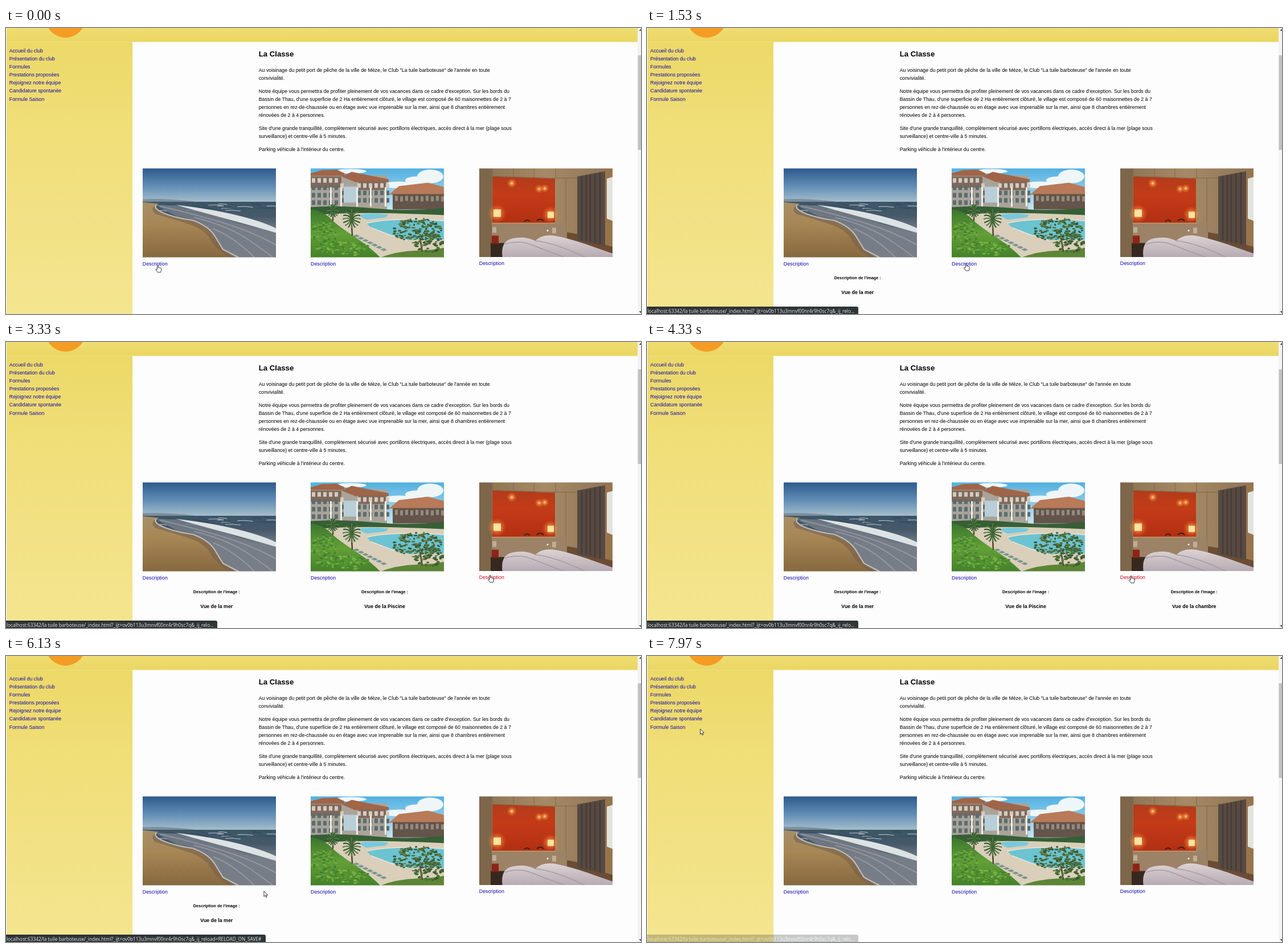
Recreate the animation shown at these times as an HTML page. Size 1115 by 502 pixels, loop 8 s.

```html
<!DOCTYPE html>
<html lang="fr">
<head>
<meta charset="utf-8">
<title>La Classe</title>
<style>
  html, body { margin: 0; width: 100%; height: 100%; overflow: hidden; background: #fdfdfd; }
  #stage { display: block; width: 1115px; height: 502px; }
  text { font: 8.8px "Liberation Sans", Arial, sans-serif; white-space: pre; }
  .link { fill: #1208ad; }
  .link.pressed { fill: #d2051c; }
  .title { font-size: 13.2px; font-weight: bold; }
  .label { font-size: 7.3px; font-weight: bold; text-anchor: middle; }
  .caption { font-weight: bold; text-anchor: middle; }
  #url { font: 8.3px "Open Sans", "Noto Sans", sans-serif; fill: #e8eaec; }
</style>
</head>
<body>
<svg id="stage" viewBox="0 0 1115 502">
  <defs>
    <linearGradient id="side" x2="0" y2="1">
      <stop stop-color="#ecd967"/><stop offset=".3" stop-color="#f0de77"/><stop offset="1" stop-color="#f4e590"/>
    </linearGradient>
    <linearGradient id="head" x2="0" y2="1">
      <stop stop-color="#efdd72"/><stop offset="1" stop-color="#ead662"/>
    </linearGradient>
    <linearGradient id="sky" x2="0" y2="1">
      <stop stop-color="#2a568b"/><stop offset=".55" stop-color="#638fb6"/><stop offset="1" stop-color="#a9c0cc"/>
    </linearGradient>
    <linearGradient id="sea" x2="0" y2="1">
      <stop stop-color="#3b5668"/><stop offset=".25" stop-color="#46596a"/><stop offset=".5" stop-color="#747d87"/><stop offset="1" stop-color="#7d7c83"/>
    </linearGradient>
    <linearGradient id="sand" x2="0" y2="1">
      <stop stop-color="#a88f68"/><stop offset=".4" stop-color="#a78655"/><stop offset="1" stop-color="#86683f"/>
    </linearGradient>
    <linearGradient id="summer" x2="0" y2="1">
      <stop stop-color="#4eafe0"/><stop offset="1" stop-color="#d5ecf2"/>
    </linearGradient>
    <linearGradient id="grass" x2="0" y2="1">
      <stop stop-color="#3a752e"/><stop offset=".5" stop-color="#62a037"/><stop offset="1" stop-color="#42802a"/>
    </linearGradient>
    <linearGradient id="wood" x2="1">
      <stop stop-color="#8a7152"/><stop offset=".5" stop-color="#a78a65"/><stop offset="1" stop-color="#8b7356"/>
    </linearGradient>
    <linearGradient id="panel" x2="0" y2="1">
      <stop stop-color="#b23c1a"/><stop offset=".4" stop-color="#c43b18"/><stop offset="1" stop-color="#b22f12"/>
    </linearGradient>
    <linearGradient id="sheet" x2="0" y2="1">
      <stop stop-color="#dcd3d3"/><stop offset="1" stop-color="#b3a8b1"/>
    </linearGradient>
    <radialGradient id="glow">
      <stop stop-color="#fff6c8"/><stop offset=".25" stop-color="#ffb654" stop-opacity=".7"/><stop offset="1" stop-color="#f0682a" stop-opacity="0"/>
    </radialGradient>
    <filter id="soft" x="0" y="0" width="1" height="1"><feGaussianBlur stdDeviation=".6"/></filter>
  </defs>

  <rect width="1115" height="502" fill="#fdfdfd"/>
  <rect x="1" width="1108" height="24.500" fill="url(#head)"/>
  <rect x="1" y="24.500" width="221" height="478" fill="url(#side)"/>
  <circle cx="104.500" cy="-18" r="35" fill="#f49c24"/>
  <rect x="1109" width="6" height="502" fill="#f3f3f3"/>
  <rect x="1109.500" y="48" width="6" height="166" fill="#c1c1c1"/>
  <path d="M1111.500 5l3-3.500 3 3.500zM1111.500 497l3 3.500 3-3.500z" fill="#505050"/>

  <g id="copy"></g>

  <svg x="240" y="246.500" width="234" height="156">
    <g filter="url(#soft)">
      <rect x="-2" y="-2" width="238" height="62" fill="url(#sky)"/>
      <path d="M0 54Q40 52 90 58L90 61H0z" fill="#7d8f9b"/>
      <rect x="-2" y="58.500" width="238" height="100" fill="url(#sea)"/>
      <g id="waves" fill="none" stroke-linecap="round"></g>
      <path d="M22 64L58 65Q110 76 150 90T234 122V156H166Q140 140 126 116T60 84z" fill="#777e87" opacity=".8"/>
      <path d="M58 64Q120 71 165 82T234 105V113Q190 100 160 92T58 64z" fill="#dde2e4"/>
      <path d="M30 66Q90 80 140 95T234 134M90 86Q150 100 190 128T228 156M124 106Q160 120 196 156" fill="none" stroke="#a3a8b0" stroke-width="2" opacity=".6"/>
      <path d="M-2 59L28 62Q16 69 34 78T88 92Q115 102 126 120T140 143L166 158H-2z" fill="url(#sand)"/>
      <path d="M24 64Q18 71 34 78T88 92Q115 102 126 120T140 143L166 158H154Q128 142 119 125T84 99T22 80Q12 70 24 64z" fill="#77614a" opacity=".6"/>
      <path d="M24 64Q18 70 36 78T88 91Q116 101 127 119T141 142L168 156" fill="none" stroke="#bebcba" stroke-width="2.200"/>
    </g>
  </svg>

  <svg x="535" y="246.500" width="234" height="156">
    <g filter="url(#soft)">
      <rect x="-2" y="-2" width="238" height="84" fill="url(#summer)"/>
      <g fill="#eff6f8">
        <ellipse cx="210" cy="14" rx="23" ry="12"/><ellipse cx="186" cy="21" rx="20" ry="7"/>
        <ellipse cx="155" cy="29" rx="28" ry="6"/><ellipse cx="70" cy="5" rx="28" ry="4"/>
      </g>
      <path d="M-2 10L58 7V12H134V72H-2z" fill="#aaa399"/>
      <path d="M-2 9L20 3 46 2 60 9 58 13H-2zM54 14L72 6 137 19V24H78z" fill="#a06549"/>
      <path d="M-2 14H54V34H-2zM84 23H132V38H84z" fill="#80695b"/>
      <path d="M136 47L155 31 206 25 236 33V46H136z" fill="#b87a58"/>
      <path d="M144 45H236V72H144z" fill="#64544a"/>
      <path d="M58 32H80V60H58z" fill="#b9ced6"/>
      <g id="facade"></g>
      <path d="M-2 68Q50 64 110 70T236 69V84H-2z" fill="#365f35"/>
      <path d="M20 81Q90 75 236 82V158H40z" fill="#d9cfba"/>
      <path d="M82 82Q104 77 136 81L132 86 98 90z" fill="#79c8dc"/>
      <path d="M98 96Q150 85 236 92V125Q200 124 170 126L140 117 106 104z" fill="#6cc3d2"/>
      <path d="M98 96Q150 85 236 92M106 104L140 117 170 126" fill="none" stroke="#e9e5d7" stroke-width="1.500"/>
      <path d="M-2 71Q24 76 35 88T82 123Q104 138 124 158H-2z" fill="url(#grass)"/>
      <path d="M118 158Q150 145 188 144T236 138V158z" fill="#5d8536"/>
      <path d="M72 100L73 118M39 78V92M192 122L196 146" stroke="#53402a" stroke-width="2.500"/>
      <g id="leaves"></g>
      <g id="loungers"></g>
    </g>
  </svg>

  <svg x="831" y="246.500" width="234" height="155.500">
    <g filter="url(#soft)">
      <rect x="-2" y="-2" width="238" height="160" fill="url(#wood)"/>
      <path d="M-2-2H22V158H-2z" fill="#7d664a"/>
      <path d="M23 14L133 18V96H23z" fill="url(#panel)"/>
      <path d="M23 0V14L134 17V0M60 0V14M96 0V16M152 16V112M134 17H172" fill="none" stroke="#78634a" stroke-width=".8"/>
      <circle cx="57" cy="26" r="9" fill="url(#glow)"/><circle cx="105" cy="36" r="8" fill="url(#glow)"/>
      <circle cx="115" cy="35" r="8" fill="url(#glow)"/>
      <circle cx="31" cy="79" r="17" fill="url(#glow)"/><circle cx="125" cy="81" r="15" fill="url(#glow)"/>
      <path d="M25 72H38V85H25zM120 76H131V87H120z" fill="#ffe3a0"/>
      <path d="M22 96H152V130H22z" fill="#9c8266"/>
      <path d="M22 96H134" stroke="#c29a70" stroke-width="1.500"/>
      <path d="M79 93q5-5 10 0M101 92q6-6 12 0" fill="none" stroke="#352217" stroke-width="2"/>
      <path d="M23 103H30V113H23zM128 104H135V114H128z" fill="#bfae95"/>
      <circle cx="120" cy="109" r="1.500" fill="#fff"/>
      <path d="M154 112L236 126V158H154z" fill="#6b4c34"/>
      <path d="M172 14L221 5V136L172 126z" fill="#574a42"/>
      <path d="M180 14V126M188 12V128M195 11V129M203 9V131M212 7V133" stroke="#473b35" stroke-width="2.500"/>
      <path d="M221 4L236 0V138L221 134z" fill="#98744d"/>
      <path d="M224 18L234 15V92L224 88z" fill="#e3e4de"/>
      <path d="M20 131H44V158H20z" fill="#37281f"/>
      <path d="M22 118h12v14h-12z" fill="#8d2417"/>
      <path d="M41 158Q36 128 58 123T98 127Q112 114 137 119T196 136L236 150V158z" fill="url(#sheet)"/>
      <path d="M45 133Q70 125 92 134T150 156M98 127Q132 130 186 156" fill="none" stroke="#a69ba2" stroke-width="1.500"/>
    </g>
  </svg>

  <g id="gallery"></g>

  <g id="status">
    <path id="bubble" fill="#2f3437"/>
    <text id="url" x="1" y="499.800"></text>
  </g>
  <g id="cursor" fill="#fff" stroke="#25252d" stroke-width=".9" stroke-linejoin="round">
    <path id="arrow" d="M0 0V9.500L2.200 7.500 3.700 11 5.200 10.300 3.700 7H6.700z"/>
    <path id="hand" d="M-1 1Q0-.8 1 1V5Q2.300 3.800 3 5.200 4.300 4.300 4.800 5.700 6.200 5.200 6.200 7V9.500L5 13H0L-3.600 8.200Q-3.400 6.500-1 8.200z"/>
  </g>
</svg>

<script>
const LOOP = 8000;
const $ = id => document.getElementById(id);

function add(parent, tag, attrs, content = '') {
  const node = document.createElementNS('http://www.w3.org/2000/svg', tag);
  for (const key in attrs) node.setAttribute(key, attrs[key]);
  node.textContent = content;
  return parent.appendChild(node);
}
const write = (parent, x, y, content, cls = '') => add(parent, 'text', { x, y, class: cls }, content);

let seed = 7;
const random = () => (seed = seed * 16807 % 2147483647) / 2147483647;

// Page text
['Accueil du club', 'Présentation du club', 'Formules', 'Prestations proposées',
 'Rejoignez notre équipe', 'Candidature spontanée', 'Formule Saison']
  .forEach((item, i) => write($('copy'), 5.8, 43.2 + 14.05 * i, item, 'link'));

write($('copy'), 443.7, 49.5, 'La Classe', 'title');
let baseline = 77.3;
[['Au voisinage du petit port de pêche de la ville de Mèze, le Club "La tuile barboteuse" de l\'année en toute',
  'convivialité.'],
 ["Notre équipe vous permettra de profiter pleinement de vos vacances dans ce cadre d'exception. Sur les bords du",
  "Bassin de Thau, d'une superficie de 2 Ha entièrement clôturé, le village est composé de 60 maisonnettes de 2 à 7",
  'personnes en rez-de-chaussée ou en étage avec vue imprenable sur la mer, ainsi que 8 chambres entièrement',
  'rénovées de 2 à 4 personnes.'],
 ["Site d'une grande tranquillité, complètement sécurisé avec portillons électriques, accès direct à la mer (plage sous",
  'surveillance) et centre-ville à 5 minutes.'],
 ["Parking véhicule à l'intérieur du centre."]
].forEach(lines => {
  for (const line of lines) {
    write($('copy'), 443.7, baseline, line);
    baseline += 14.05;
  }
  baseline += 8.8;
});

// Small repeated parts of the pictures
for (let i = 0; i < 26; i++) {
  const x = 30 + random() * 200, y = 60 + random() * 15, w = 6 + random() * 22;
  add($('waves'), 'path', { d: `M${x} ${y}q${w / 2}-1 ${w} 1`, stroke: i % 3 ? '#31495a' : '#bcc8ce', 'stroke-width': 1 });
}
for (let x = 2; x < 134; x += 10) {
  if (x > 52 && x < 82) continue;
  for (let y = x < 52 ? 17 : 26; y < 62; y += 13) {
    add($('facade'), 'rect', { x, y, width: 6, height: 8, fill: y < 30 ? '#d2cbbf' : '#5b6d70' });
  }
}
for (let x = 148; x < 230; x += 9) {
  add($('facade'), 'rect', { x, y: 48 + x % 2, width: 5, height: 9, fill: '#938b80' });
}
for (const x of [34, 52, 80, 104, 130]) {
  add($('facade'), 'rect', { x, y: 33, width: 3, height: 34, fill: '#f0eee6' });
}

function foliage(cx, cy, rx, ry, count, colors) {
  for (let i = 0; i < count; i++) {
    const angle = random() * 2 * Math.PI, r = Math.sqrt(random());
    add($('leaves'), 'ellipse', {
      cx: cx + rx * r * Math.cos(angle), cy: cy + ry * r * Math.sin(angle),
      rx: 1.5 + random() * 2, ry: 1 + random(), fill: colors[i % colors.length]
    });
  }
}
function palm(cx, cy, size) {
  for (let i = 0; i < 16; i++) {
    const angle = i * Math.PI / 8, x = cx + size * Math.cos(angle), y = cy + size * Math.sin(angle);
    add($('leaves'), 'path', { d: `M${cx} ${cy}Q${(cx + x) / 2} ${y - 3} ${x} ${y}`, stroke: i % 2 ? '#365a33' : '#527840', 'stroke-width': 2.2, fill: 'none' });
  }
}
foliage(22, 120, 22, 28, 110, ['#559434', '#72aa3f', '#417d30']);
foliage(62, 141, 42, 12, 100, ['#60a036', '#7ab146', '#47832d']);
foliage(187, 109, 42, 22, 170, ['#4a6b38', '#617d45', '#395732']);
foliage(208, 131, 26, 17, 80, ['#4d7136', '#3b5a31']);
palm(72, 89, 16);
palm(39, 75, 11);
for (let i = 0; i < 7; i++) {
  add($('loungers'), 'path', { d: `M${74 + i * 8} ${118 + i * 4}l7-2 5 3-6 2z`, fill: '#7b9492' });
}

const gallery = [
  { x: 239.8, y: 416.8, caption: 'Vue de la mer', presses: [300, 7020] },
  { x: 535.1, y: 416.8, caption: 'Vue de la Piscine', presses: [1560, 5330] },
  { x: 830.8, y: 416.2, caption: 'Vue de la chambre', presses: [3280, 4270] }
].map(item => {
  const link = write($('gallery'), item.x, item.y, 'Description', 'link');
  const details = add($('gallery'), 'g', {});
  write(details, item.x + 130, 440.6, "Description de l'image :", 'label');
  write(details, item.x + 130, 467, item.caption, 'caption');
  return { ...item, link, details };
});

// Motion: each key is [time, ...values]
const cursorKeys = [
  [0, 266.5, 415.8], [520, 266, 415], [900, 496, 419], [1150, 558, 414], [1500, 560, 413], [2230, 560, 413],
  [2850, 846, 411], [3150, 850, 409], [4450, 850, 410], [4950, 562, 412], [5750, 562, 412],
  [6680, 264, 414], [6800, 260, 414], [7300, 260, 414], [7850, 93.5, 128], [LOOP, 93.5, 128]
];
const statusKeys = [
  [0, 0], [90, 0], [250, 1], [6250, 1], [6450, 0], [6730, 0], [6880, 1], [7800, 1], [8030, 0]
];
const PRESS = 110;

function sample(keys, t, ease) {
  const i = Math.max(1, keys.findIndex(key => key[0] > t));
  const a = keys[i - 1], b = keys[i];
  const k = ease((t - a[0]) / (b[0] - a[0]));
  return a.slice(1).map((v, j) => v + (b[j + 1] - v) * k);
}
const smooth = k => k * k * (3 - 2 * k);
const linear = k => k;

const address = 'localhost:63342/la tuile barboteuse/_index.html?_ijt=ov0b113u3mnvf00nr4r9h0sc7q&_ij_relo';

function draw(t) {
  const [x, y] = sample(cursorKeys, t, smooth);
  $('cursor').setAttribute('transform', `translate(${x} ${y})`);
  let over = false;
  for (const { x: left, link, details, presses: [show, hide] } of gallery) {
    over ||= x >= left && x <= left + 44 && y > 406 && y < 418;
    link.classList.toggle('pressed', [show, hide].some(p => t >= p && t < p + PRESS));
    details.style.display = t >= show + PRESS && t < hide + PRESS ? '' : 'none';
  }
  $('hand').style.display = over ? '' : 'none';
  $('arrow').style.display = over ? 'none' : '';

  const expanded = t >= 4450 && t < 6450;
  const width = expanded ? 456 : 371;
  $('bubble').setAttribute('d', `M0 489H${width - 3}q3 0 3 3V502H0z`);
  $('url').textContent = address + (expanded ? 'ad=RELOAD_ON_SAVE#' : '...');
  $('status').setAttribute('opacity', sample(statusKeys, t, linear)[0]);
}

const start = performance.now();
function tick() {
  draw((performance.now() - start) % LOOP);
  requestAnimationFrame(tick);
}
tick();
</script>
</body>
</html>
```
